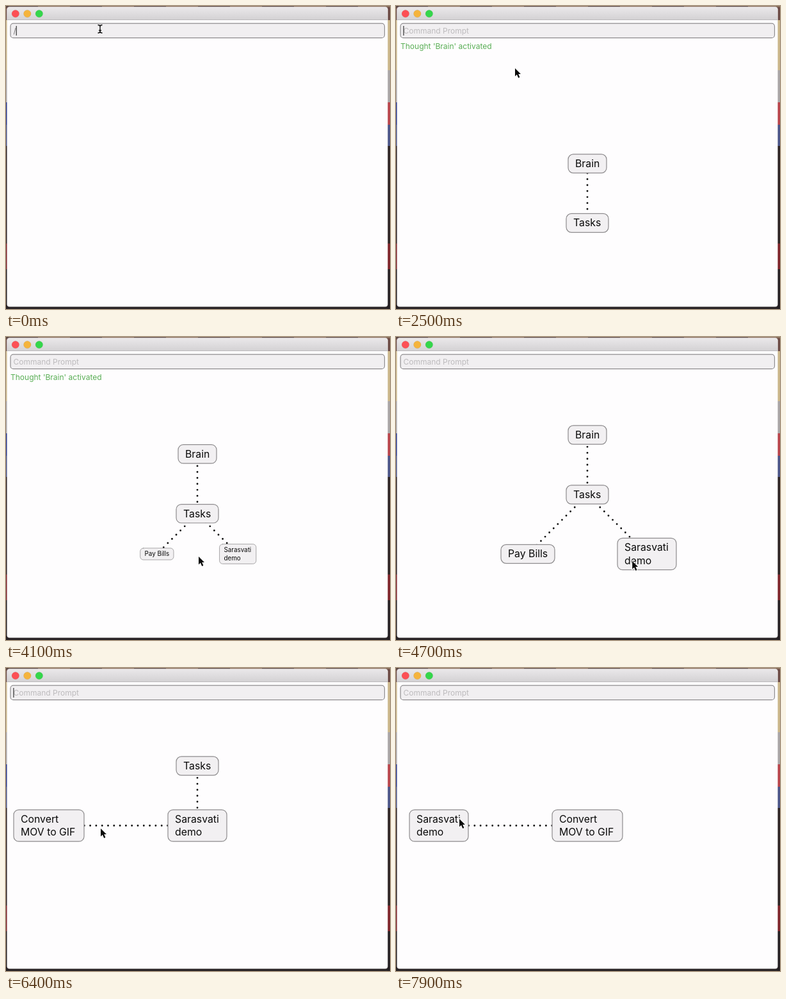
Animation of 600x472 px, one loop 8 s. Source, as an HTML page with a canvas:

```html
<!DOCTYPE html>
<html lang="en">
<head>
<meta charset="utf-8">
<title>Thought map</title>
<style>
  html, body { margin: 0; width: 600px; height: 472px; overflow: hidden; }
  canvas { display: block; }
</style>
</head>
<body>
<canvas width="600" height="472"></canvas>
<script>
const ctx = document.querySelector('canvas').getContext('2d');
const FONT = 'Inter, "Liberation Sans", sans-serif';
const LOOP = 8000, MOVE = 500, SUBMIT = 1600, STATUS_END = 4600;

const nodes = {
  Brain: { lines: ['Brain'], width: 60 },
  Tasks: { lines: ['Tasks'], width: 66 },
  Bills: { lines: ['Pay Bills'], width: 84 },
  Demo: { lines: ['Sarasvati', 'demo'], width: 92 },
  Convert: { lines: ['Convert', 'MOV to GIF'], width: 110 },
};
const links = [['Brain', 'Tasks'], ['Tasks', 'Bills'], ['Tasks', 'Demo'], ['Demo', 'Convert']];

// Each scene centres its active thought and lists where the visible ones sit.
const scenes = [
  { start: 0, at: {} },
  { start: SUBMIT, active: 'Brain', at: { Brain: [299, 245.5], Tasks: [299, 338] } },
  { start: 3790, active: 'Tasks',
    at: { Brain: [299, 152.5], Tasks: [299, 245.5], Bills: [206, 338], Demo: [392, 338] } },
  { start: 5205, active: 'Demo', at: { Tasks: [299, 152.5], Demo: [299, 245.5], Convert: [67, 245.5] } },
  { start: 7380, active: 'Convert', at: { Demo: [67, 245.5], Convert: [299, 245.5] } },
];

const typing = [[0, '/'], [100, '/a'], [400, '/a '], [700, '/a B'], [800, '/a Br'],
  [900, '/a Bra'], [1000, '/a Brai'], [1100, '/a Brain'], [SUBMIT, '']];

// time, x, y of the pointer tip
const pointer = [[0, 147, 36], [1900, 147, 36], [2500, 186, 97], [3300, 301, 342], [4250, 301, 342],
  [4950, 397, 352], [5500, 397, 352], [6400, 148, 250], [6900, 99, 235], [LOOP, 99, 235]];

const ease = t => t * t * (3 - 2 * t);
const mix = (a, b, p) => a + (b - a) * p;
const latest = (list, time, key) => list.filter(item => item[key] <= time).pop();

function rect(x, y, w, h, fill) {
  ctx.fillStyle = fill;
  ctx.fillRect(x, y, w, h);
}

function box(x, y, w, h, radius, fill, stroke, lineWidth = 1.2) {
  ctx.beginPath();
  ctx.roundRect(x, y, w, h, radius);
  ctx.fillStyle = fill;
  ctx.fill();
  if (!stroke) return;
  ctx.strokeStyle = stroke;
  ctx.lineWidth = lineWidth;
  ctx.stroke();
}

function text(string, x, y, size, color) {
  ctx.font = `${size}px ${FONT}`;
  ctx.fillStyle = color;
  ctx.fillText(string, x, y);
}

function drawDesktop() {
  rect(0, 0, 600, 472, '#2a2426');
  const bands = [[0, '#6b4a44'], [22, '#cbb68a'], [100, '#a9a5a6'], [150, '#b8434a'], [185, '#4a5487'],
    [218, '#2c2223'], [370, '#7d2229'], [410, '#251f22']];
  bands.forEach(([y, color], i) => {
    const h = (bands[i + 1]?.[0] ?? 472) - y;
    rect(596, y, 4, h, color);
    rect(0, y, 2, h, i === 3 ? '#2b3a8c' : color);
  });
  for (let x = 0; x < 600; x += 50) rect(x, 0, 50, 2, x % 100 ? '#8a6f5c' : '#5b4742');
}

function drawWindow() {
  box(1.5, 1.5, 595, 467, 4, '#fefdfe');
  const shade = ctx.createLinearGradient(0, 1, 0, 22);
  shade.addColorStop(0, '#ebe9eb');
  shade.addColorStop(1, '#d3d1d3');
  box(1.5, 1.5, 595, 20.5, [4, 4, 0, 0], shade);
  rect(1.5, 21, 595, 1, '#bdbbbd');
  ['#fc5055', '#f5b43c', '#35d64b'].forEach((color, i) =>
    box(9 + 18.5 * i, 6.2, 11.6, 11.6, 6, color, 'rgba(0,0,0,.1)', 0.6));
}

function drawPrompt(time) {
  box(7, 27.2, 584.5, 22.5, 4.5, '#f1eff1', '#8e8c8e');
  const typed = latest(typing, time, 0)[1];
  text(typed || 'Command Prompt', 11.5, 42.8, 12, typed ? '#777577' : '#bdbbbd');
  const blinkOn = time % 1000 >= 200 && time % 1000 < 700;
  if (time < SUBMIT || blinkOn) rect(11.3 + ctx.measureText(typed).width, 31, 1.2, 15, '#333');
  if (time >= SUBMIT && time < STATUS_END) text("Thought 'Brain' activated", 7, 66.8, 12, '#59ae55');
}

function poseNodes(time) {
  const index = scenes.indexOf(latest(scenes, time, 'start'));
  const scene = scenes[index], previous = scenes[index - 1] ?? scenes[0];
  const t = Math.min(1, (time - scene.start) / MOVE), p = ease(t);
  const poses = {};
  for (const name in nodes) {
    const before = previous.at[name], after = scene.at[name];
    if (!after && (!before || t === 1)) continue;
    // Newcomers grow out of the active thought, the others shrink into the last one.
    const from = before ?? previous.at[scene.active] ?? scene.at[scene.active];
    const to = after ?? scene.at[previous.active];
    poses[name] = {
      x: mix(from[0], to[0], p),
      y: mix(from[1], to[1], p),
      scale: !after ? 1 - t : !before ? t : 1,
      alpha: after ? 1 : 1 - t,
    };
  }
  return { poses, dashShift: index === 1 ? 3.7 : 0 };
}

function drawLink(a, b, shift) {
  ctx.setLineDash([0, 9.3]);
  ctx.lineDashOffset = shift;
  ctx.lineCap = 'round';
  ctx.lineWidth = 2.9;
  ctx.strokeStyle = '#111';
  ctx.beginPath();
  ctx.moveTo(a.x, a.y);
  ctx.lineTo(b.x, b.y);
  ctx.stroke();
  ctx.setLineDash([]);
}

function drawNode({ lines, width }, { x, y, scale, alpha }) {
  if (scale <= 0) return;
  const height = 9 + 20.2 * lines.length;
  ctx.save();
  ctx.translate(x, y);
  ctx.scale(scale, scale);
  ctx.globalAlpha = alpha;
  box(-width / 2, -height / 2, width, height, 8, '#f2f0f2', '#8e8c8e');
  lines.forEach((line, i) => text(line, 11 - width / 2, 20 + 20.4 * i - height / 2, 15.8, '#0a0a0a'));
  ctx.restore();
}

function drawMap(time) {
  const { poses, dashShift } = poseNodes(time);
  for (const [a, b] of links) if (poses[a] && poses[b]) drawLink(poses[a], poses[b], dashShift);
  for (const name in poses) drawNode(nodes[name], poses[name]);
}

function drawPointer(time) {
  const a = latest(pointer, time, 0), b = pointer[pointer.indexOf(a) + 1];
  const p = ease((time - a[0]) / (b[0] - a[0]));
  ctx.save();
  ctx.translate(mix(a[1], b[1], p), mix(a[2], b[2], p));
  ctx.lineCap = 'butt';
  if (time < 2000) {
    ctx.lineWidth = 1.4;
    ctx.strokeStyle = '#111';
    ctx.stroke(new Path2D('M-3.5-6.5Q0-6.5 0-4Q0-6.5 3.5-6.5M0-5V5M-3.5 6Q0 6 0 3.5Q0 6 3.5 6M-2 2H2'));
  } else {
    const arrow = new Path2D('M0 0V12.4L2.9 9.8 5.2 15 7.4 14 5.2 9H9Z');
    ctx.lineWidth = 1.8;
    ctx.strokeStyle = '#fff';
    ctx.stroke(arrow);
    ctx.fillStyle = '#0a0a0a';
    ctx.fill(arrow);
  }
  ctx.restore();
}

function draw(now) {
  const time = now % LOOP;
  drawDesktop();
  drawWindow();
  drawPrompt(time);
  drawMap(time);
  drawPointer(time);
}

const origin = performance.now();
function tick() {
  draw(performance.now() - origin);
  requestAnimationFrame(tick);
}
tick();
</script>
</body>
</html>
```
